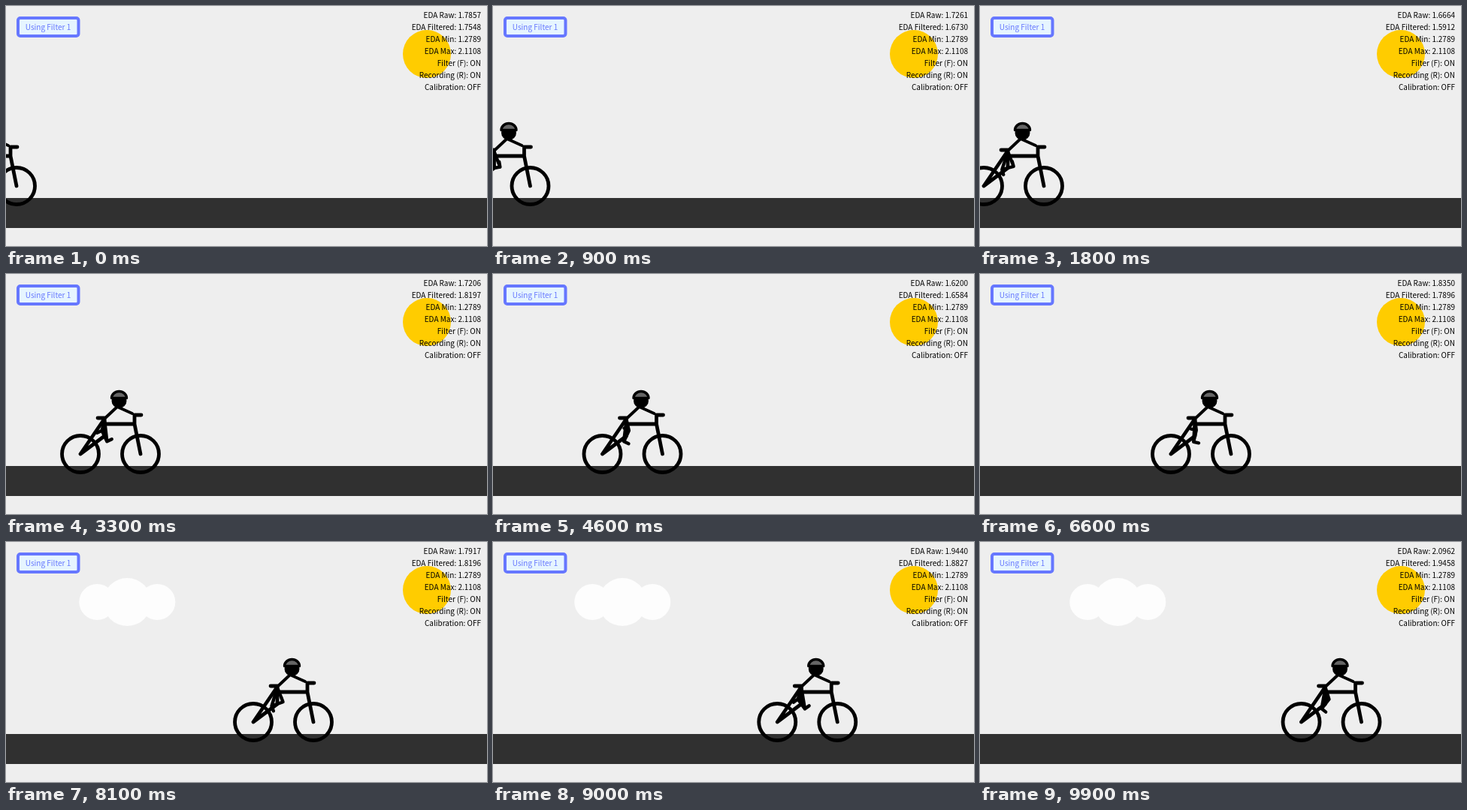
Write an HTML page that moves like this. It is 640 px wide and 320 px high and loops after 10 s.

```html
<!DOCTYPE html>
<html lang="en">
<head>
<meta charset="utf-8">
<title>EDA bike ride</title>
<style>
  html, body { margin: 0; width: 100%; height: 100%; overflow: hidden; background: #eee; }
  svg { display: block; width: 100vw; height: 100vh; }
  text { font: 10px "Noto Sans CJK JP", "Noto Sans CJK SC", "Noto Sans", sans-serif; }
  .line { fill: none; stroke: #000; stroke-width: 4.8; stroke-linecap: round; stroke-linejoin: round; }
</style>
</head>
<body>
<svg viewBox="0 0 640 320">
  <rect width="640" height="320" fill="#eee"/>
  <rect y="256" width="640" height="40" fill="#303030"/>
  <circle cx="560" cy="64" r="32" fill="#fc0"/>
  <g id="cloud" fill="#fdfdfd">
    <circle cx="-40" cy="80" r="24"/>
    <circle cy="80" r="32"/>
    <circle cx="40" cy="80" r="24"/>
  </g>
  <rect x="16" y="16" width="80.5" height="24" rx="3" fill="#e6f5ff" stroke="#6677ff" stroke-width="4"/>
  <text x="56" y="32" text-anchor="middle" fill="#6677ff">Using Filter 1</text>
  <g id="bike">
    <g class="line">
      <circle cx="-80" cy="240" r="24.5"/>
      <circle cy="240" r="24.5"/>
      <path d="M0 240L-8 200V188H1M-8 200H-48M-80 240L-48 193M-80 240L-48 216V193M-57 192H-48"/>
      <path d="M-48 193L-31 177L-11 186" stroke-width="4"/>
      <path id="legs" stroke-width="4.4"/>
    </g>
    <circle cx="-28.5" cy="169" r="10"/>
    <path d="M-38.5 165.5A10 9 0 0 1 -18.5 165.5Z" fill="#666" stroke="#000" stroke-width="3.4" stroke-linejoin="round"/>
  </g>
  <g id="readout" text-anchor="end"></g>
</svg>
<script>
  const LOOP = 10000, STEP = 100;
  const times = [0, 1800, 3300, 4600, 6600, 8100, 9900];
  const frontWheel = [14, 85, 179, 225.5, 334, 409, 507.5];
  const crankAngle = [-184, 164, 605, 835, 1363, 1780, 2288];
  const rawLevel = [1.7857, 1.6664, 1.7206, 1.62, 1.835, 1.7917, 2.0962];
  const filteredLevel = [1.7548, 1.5912, 1.8197, 1.6584, 1.7896, 1.8196, 1.9458];

  const byId = id => document.getElementById(id);
  const [bike, legs, cloud, readout] = ['bike', 'legs', 'cloud', 'readout'].map(byId);

  const rows = ['EDA Raw: ', 'EDA Filtered: ', 'EDA Min: 1.2789', 'EDA Max: 2.1108',
    'Filter (F): ON', 'Recording (R): ON', 'Calibration: OFF'].map((label, i) => {
    const row = document.createElementNS('http://www.w3.org/2000/svg', 'text');
    row.setAttribute('x', 632);
    row.setAttribute('y', 16 + 16 * i);
    row.textContent = label;
    return readout.appendChild(row);
  });

  function sample(values, t) {
    let i = 0;
    while (i < times.length - 2 && t > times[i + 1]) i++;
    const part = (t - times[i]) / (times[i + 1] - times[i]);
    return values[i] + (values[i + 1] - values[i]) * part;
  }

  // Hip to crank end, then along the pedal at a right angle to the crank.
  function legPath(angle, side) {
    const c = Math.cos(angle) * side, s = Math.sin(angle) * side;
    const x = -48 + 8 * c, y = 216 + 8 * s;
    return `M-48 194L${x} ${y}l${7 * s} ${-7 * c}M-48 216L${x} ${y}`;
  }

  function draw(t) {
    bike.setAttribute('transform', `translate(${sample(frontWheel, t)})`);
    const angle = sample(crankAngle, t) * Math.PI / 180;
    legs.setAttribute('d', legPath(angle, 1) + legPath(angle, -1));
    cloud.setAttribute('transform', `translate(${161.3 + (t - 8100) * 0.0122})`);
    cloud.setAttribute('visibility', t >= 7300 ? 'visible' : 'hidden');
    rows[0].textContent = 'EDA Raw: ' + sample(rawLevel, t).toFixed(4);
    rows[1].textContent = 'EDA Filtered: ' + sample(filteredLevel, t).toFixed(4);
  }

  const start = performance.now();
  function tick() {
    const t = (performance.now() - start) % LOOP;
    draw(Math.floor(t / STEP) * STEP);
    requestAnimationFrame(tick);
  }
  tick();
</script>
</body>
</html>
```
